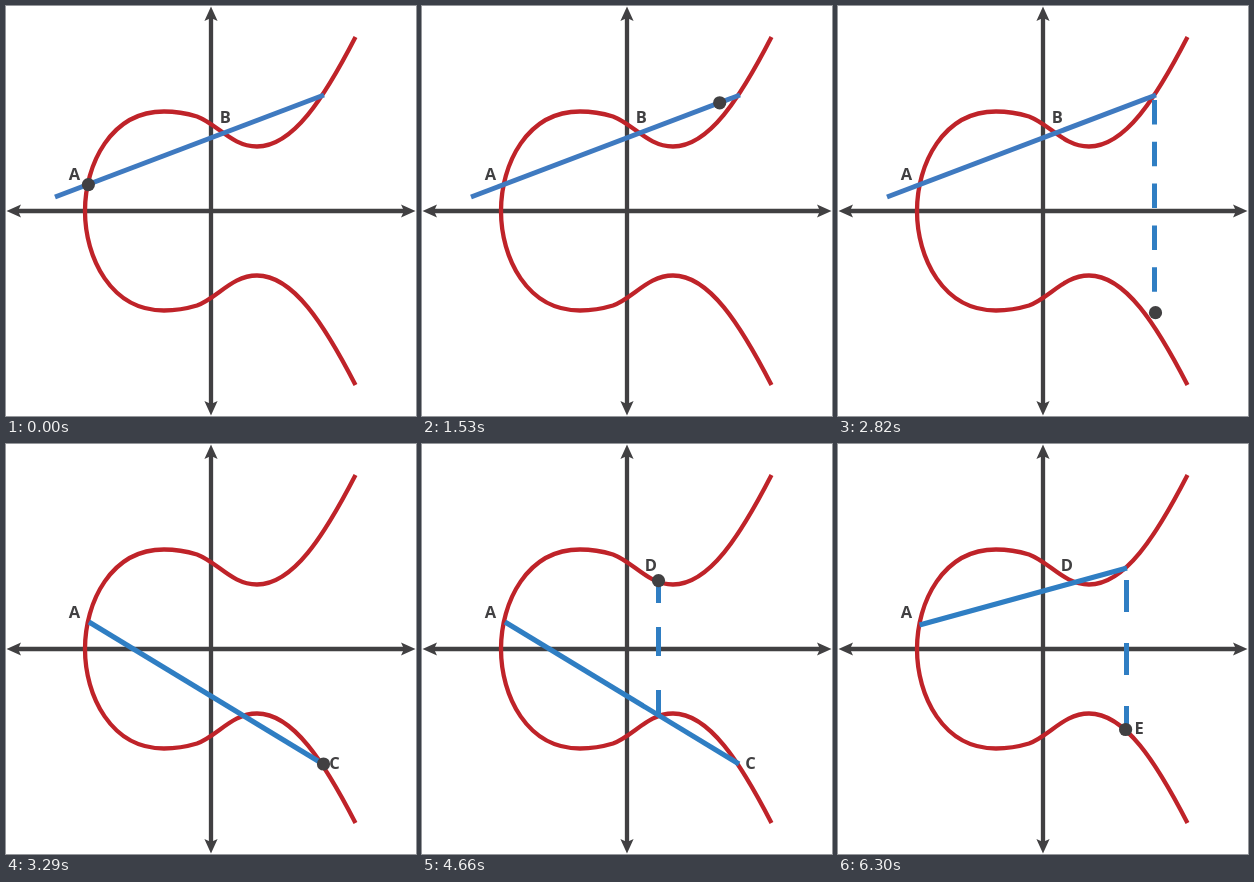
These frames come from a looping animation (410x410 px, 8.23 s). An HTML page:

```html
<!DOCTYPE html>
<html lang="en">
<head>
<meta charset="utf-8">
<title>Point addition on a curve</title>
<style>
  html, body { margin: 0; width: 100%; height: 100%; overflow: hidden; background: #fff; }
  svg { display: block; width: 100vw; height: 100vh; }
  .axis { stroke: #414042; stroke-width: 4.3; }
  .ink { fill: #414042; }
  .curve { fill: none; stroke: #bf2329; stroke-width: 4.3; stroke-linejoin: round; }
  .chord, .drop { fill: none; stroke: #2f7ec3; stroke-width: 5; }
  text { font: 700 16.5px "Open Sans", "Noto Sans", sans-serif; fill: #414042; }
</style>
</head>
<body>
<svg viewBox="0 0 410 410">
  <defs>
    <path id="half" d="M349.5 31C318 92 287 140.5 251 140.5C226 140.5 212 118.5 191 110.5C181 107.5 170 105.5 158 105.5C105 105.5 79 158 79 205"/>
    <path id="tip" class="ink" d="M205 0.5L211.6 15L205 12L198.4 15Z"/>
    <clipPath id="reveal"><rect id="window" width="410"/></clipPath>
  </defs>

  <path class="axis" d="M205 10V400M10 205H400"/>
  <use href="#tip"/>
  <use href="#tip" transform="rotate(90 205 205)"/>
  <use href="#tip" transform="rotate(180 205 205)"/>
  <use href="#tip" transform="rotate(270 205 205)"/>

  <use href="#half" class="curve"/>
  <use href="#half" class="curve" transform="matrix(1 0 0 -1 0 410)"/>

  <g clip-path="url(#reveal)">
    <path id="dropC" class="drop" d="M316.5 94V320" stroke-dasharray="24.5 17.3"/>
    <path id="dropD" class="drop" d="M236.5 271V246M236.5 212V183M236.5 159V136"/>
    <path id="dropE" class="drop" d="M288.5 136V168M288.5 199V231M288.5 262V286"/>
  </g>
  <path id="chordAB" class="chord" d="M49 191L318 89" style="stroke:#3f7ac0"/>
  <path id="chordAC" class="chord" d="M83 178L317 320"/>
  <path id="chordAD" class="chord" d="M81.5 181L289 124"/>

  <text x="62.7" y="174">A</text>
  <text id="B" x="213.7" y="117">B</text>
  <text id="C" x="323.3" y="325.3">C</text>
  <text id="D" x="222.7" y="127">D</text>
  <text id="E" x="296.4" y="290.4">E</text>

  <circle id="dot" class="ink" r="6.6"/>
</svg>
<script>
  const LOOP = 8230;
  const $ = id => document.getElementById(id);

  // Each leg moves the dot in equal jumps: start, gap (ms), jumps, from, to.
  const legs = [
    { start: 200, gap: 70, jumps: 12, from: [82.4, 178.6], to: [218.5, 126.7] },
    { start: 1040, gap: 70, jumps: 10, from: [218.5, 126.7], to: [317.5, 89.3] },
    { start: 1770, gap: 70, jumps: 17, from: [317.5, 93.5], to: [317.5, 320] },
    { start: 3460, gap: 70, jumps: 7, from: [317.5, 320], to: [236.5, 271.5] },
    { start: 4050, gap: 65, jumps: 9, from: [236.5, 271.5], to: [236.5, 136.6] },
    { start: 5130, gap: 63.3, jumps: 7, from: [236.5, 136.6], to: [287.6, 124] },
    { start: 5540, gap: 70, jumps: 11, from: [287.6, 124], to: [287.6, 285.5] }
  ];

  const stepped = (t, start, gap, jumps) =>
    Math.max(0, Math.min(jumps, Math.floor((t - start) / gap) + 1)) / jumps;

  function dotAt(t) {
    const leg = legs.filter(l => t >= l.start).pop();
    if (!leg) return legs[0].from;
    const k = stepped(t, leg.start, leg.gap, leg.jumps);
    return leg.from.map((v, i) => v + (leg.to[i] - v) * k);
  }

  const show = (id, opacity) => $(id).setAttribute("opacity", Number(opacity));

  function draw(t) {
    const [x, y] = dotAt(t);
    const upward = t >= 4050 && t < 4930;
    const between = (a, b) => t >= a && t < b;

    $("dot").setAttribute("cx", x);
    $("dot").setAttribute("cy", y);
    $("window").setAttribute("y", upward ? y : 0);
    $("window").setAttribute("height", upward ? 410 - y : y);

    show("dropC", between(1770, 3290));
    show("dropD", upward);
    show("dropE", t >= 5540);

    const fadeC = t < 4930 ? stepped(t, 2960, 30, 3) : 0;
    show("chordAB", t < 3290);
    show("chordAC", fadeC);
    show("chordAD", t >= 4930);

    show("B", t < 3290);
    show("C", fadeC);
    show("D", stepped(t, 4600, 30, 3));
    show("E", stepped(t, 6270, 30, 2));
  }

  const begin = performance.now();
  function tick() {
    draw((performance.now() - begin) % LOOP);
    requestAnimationFrame(tick);
  }
  draw(0);
  requestAnimationFrame(tick);
</script>
</body>
</html>
```
